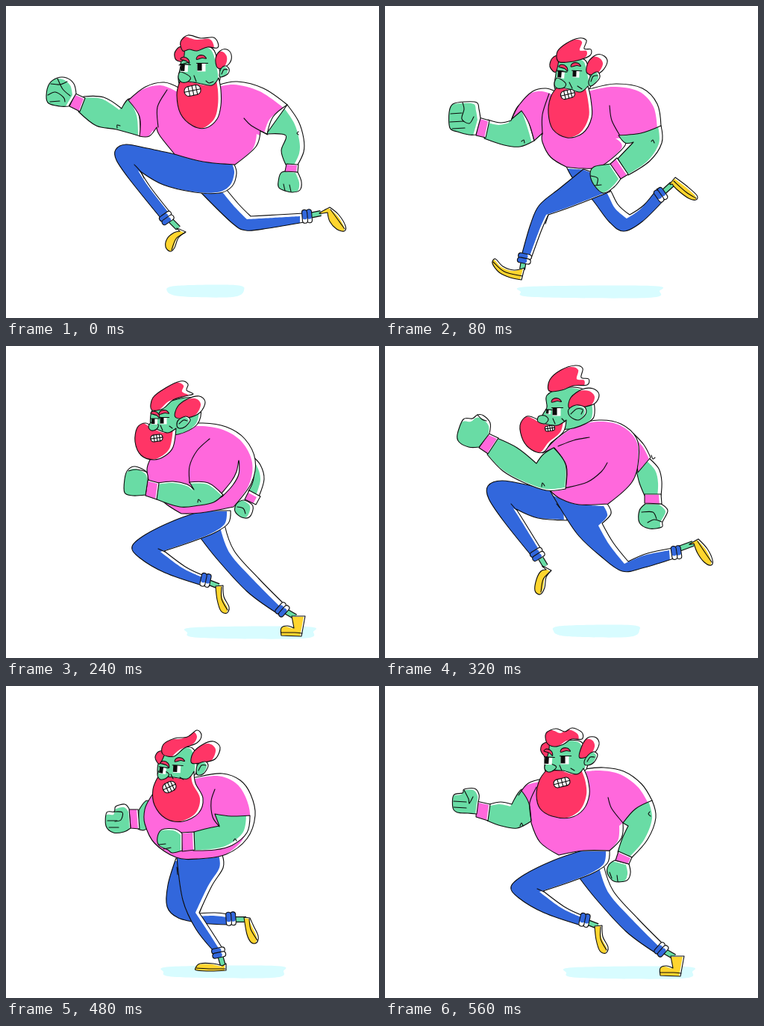
An HTML page with a canvas for the animation above (640 ms loop, 500 by 417 pixels).

```html
<!DOCTYPE html>
<html lang="en">
<head>
<meta charset="utf-8">
<title>Runner</title>
<style>
html, body { margin: 0; width: 100%; height: 100%; overflow: hidden; background: #fff }
canvas { display: block }
</style>
</head>
<body>
<canvas id="stage" width="500" height="417"></canvas>
<script>
const ctx = document.getElementById('stage').getContext('2d');
const GREEN = '#69dca5', PINK = '#ff68dc', BLUE = '#3267dc', RED = '#ff3566',
      YELLOW = '#ffd52e', SHADE = '#d8fcff', INK = '#0c0c0c';

// Smooth curve through "x,y" points; a "!" after a point makes it a corner.
function curve(text, closed = true) {
  const pts = text.split(' ').map(s => {
    const [x, y] = s.split(',').map(parseFloat);
    return { x, y, k: s.endsWith('!') ? 0 : 1 / 6 };
  });
  const n = pts.length, path = new Path2D();
  const at = i => closed ? pts[(i + n) % n] : pts[Math.max(0, Math.min(n - 1, i))];
  path.moveTo(pts[0].x, pts[0].y);
  for (let i = 0; i < (closed ? n : n - 1); i++) {
    const a = at(i - 1), b = at(i), c = at(i + 1), d = at(i + 2);
    path.bezierCurveTo(b.x + (c.x - a.x) * b.k, b.y + (c.y - a.y) * b.k,
      c.x - (d.x - b.x) * c.k, c.y - (d.y - b.y) * c.k, c.x, c.y);
  }
  if (closed) path.closePath();
  return path;
}

// White outlined shape whose colour is printed slightly off register.
function part(color, shape, dx = -3, dy = 2) {
  const path = typeof shape === 'string' ? curve(shape) : shape;
  ctx.fillStyle = '#fff';
  ctx.fill(path);
  ctx.save();
  ctx.clip(path);
  ctx.translate(dx, dy);
  ctx.fillStyle = color;
  ctx.fill(path);
  ctx.restore();
  ctx.stroke(path);
}

function line(...curves) {
  for (const c of curves) ctx.stroke(curve(c, false));
}

function placed(x, y, deg, draw) {
  ctx.save();
  ctx.translate(x, y);
  ctx.rotate(deg * Math.PI / 180);
  draw();
  ctx.restore();
}

function cuff(x, y, deg) {
  placed(x, y, deg, () => {
    for (const top of [-6, 0]) {
      const band = new Path2D();
      band.roundRect(-9, top, 18, 7, 3.5);
      part(BLUE, band, -5, 0);
    }
  });
}

function foot(ankle, shoe, sole) {
  const path = curve(ankle, false);
  for (const [color, width] of [[INK, 8], [GREEN, 5.6]]) {
    ctx.save();
    ctx.strokeStyle = color;
    ctx.lineWidth = width;
    ctx.lineCap = 'butt';
    ctx.stroke(path);
    ctx.restore();
  }
  part(YELLOW, shoe, -2, 1);
  if (sole) line(sole);
}

function eye(x, y, size, deg) {
  placed(x, y, deg, () => {
    ctx.fillStyle = '#fff';
    ctx.fillRect(-size / 2, -size / 2, size, size);
    ctx.fillStyle = INK;
    ctx.fillRect(-size / 2, -size / 2, size * .55, size * .9);
    line(`${-size / 2 - 1},${-size / 2} ${size / 2 + 3},${-size / 2}`);
  });
}

function brow(x, y, deg) {
  placed(x, y, deg, () => part(RED, '-6,1 -3,-3 4,-2 7,3 2,1', 0, 0));
}

function mouth(x, y, w, h, deg) {
  placed(x, y, deg, () => {
    const box = new Path2D();
    box.roundRect(-w / 2, -h / 2, w, h, h * .45);
    part('#fff', box);
    line(`${-w / 2},0 ${w / 2},0`);
    for (const k of [-.22, .02, .25]) line(`${w * k},${-h / 2} ${w * k},${h / 2}`);
  });
}

function head(h) {
  part(GREEN, h.face, -3, 1);
  if (h.tuft) part(RED, h.tuft, 0, 0);
  part(RED, h.quiff, -6, 2);
  part(RED, h.back, -6, 3);
  part(GREEN, h.ear, -2, 1);
  line(h.earFold);
  part(RED, h.beard, -4, 0);
  part(GREEN, h.nose, 0, 0);
  h.eyes.forEach(e => eye(...e));
  h.brows.forEach(b => brow(...b));
  mouth(...h.mouth);
}

const uppers = {
  leap() {
    part(GREEN, '377,132! 392,154 399,177 399,195 390,214! 375,212! 369,193 375,173 349,171!', -6, 2);
    part(GREEN, '370,222 365,235 366,243 374,247 384,249 394,246 396,235 391,222!', -3, 1);
    line('372,238 374,247', '380,239 382,248', '392,168 390,170 392,172');
    part(PINK, '376,211! 392,212! 391,222! 374,221!', -2, 1);
    part(GREEN, '104,121! 131,122 155,137! 166,124 178,144 180,174! 148,165 121,160 97,141!');
    line('149,163 149,159 153,160');
    part(PINK, '164,126! 187,108 212,102 233,110! 284,106! 310,101 345,110 377,132! 358,148 350,171! 341,167! 335,188 307,212! 264,208 226,198! 206,173 202,162! 192,174 179,174! 179,148', -5, 4);
    line('216,112 203,135 204,162', '319,150 329,160 351,172');
    part(PINK, '93,117! 106,123! 99,141! 85,134!', -2, 1);
    part(GREEN, '94,117! 91,104 81,96 69,96 58,104 54,120 57,130 72,134 84,134!', -5, 2);
    line('60,104 72,105 82,101', '56,119 66,115 77,122 79,128', '69,97 76,111 86,120', '59,128 72,127');
    head({
      face: '238,58 258,52 277,57 284,75 287,98 277,109 258,113 236,107 231,98 234,80',
      tuft: '237,73 228,72 226,63 232,55 239,57',
      quiff: '237,60 234,48 244,39 261,43 278,42 284,49 283,56 270,55 256,60 246,58',
      back: '283,82 281,70 287,60 296,58 302,65 300,76 290,83',
      ear: '286,92 288,84 294,80 299,84 297,91 288,95', earFold: '289,91 292,85 297,85',
      beard: '233,101! 229,119 234,144 250,160 268,163 283,151 288,133 288,112 285,96! 276,106 257,103 244,101',
      nose: '234,88 231,96 236,102 244,101 247,95',
      eyes: [[239, 83, 10, 4], [262, 82, 11, 0]], brows: [[240, 72, 18], [261, 69, -15]],
      mouth: [250, 113, 22, 13, -12]
    });
    line('252,93 255,101', '268,100 272,103 278,101', '232,79 245,75');
  },

  reach() {
    part(GREEN, '138,152! 155,156 169,153! 183,132 200,180! 181,188 160,186 133,177!', -3, 3);
    part(PINK, '170,151! 180,132 198,114 215,110 228,114! 278,110! 310,104 345,110 365,131 370,161! 345,170 314,173! 322,186 290,214 265,217 243,215! 222,202 211,182 211,170! 200,180! 193,157 183,140!', -5, 4);
    line('220,117 211,145 211,171', '301,133 304,153 316,175', '183,181 186,179 187,183');
    part(GREEN, '313,173! 343,170 370,160! 371,183 355,207 326,226! 312,204! 333,182! 322,183', -4, 1);
    line('357,181 359,179 361,183');
    part(GREEN, '303,211! 295,212 280,215 275,224 280,239 293,250 307,242 316,231!', -3, 0);
    line('276,227 285,230 284,239', '281,240 290,239');
    part(PINK, '311,203! 302,211! 316,231! 326,225!', -2, 1);
    part(PINK, '126,149! 140,153! 135,176! 122,173!', -2, 1);
    part(GREEN, '128,150! 126,138 123,129 107,128 91,131 86,142 87,163 97,168 112,172 122,172!', -4, 2);
    line('104,129 106,138 103,151 113,157 119,148', '88,144 103,143', '87,155 105,154', '90,164 107,163');
    head({
      face: '231,73 250,70 268,72 274,89 275,109 256,118 232,113 227,107 229,91',
      tuft: '229,88 221,81 224,70 233,67',
      quiff: '232,74 231,61 243,50 260,43 270,46 267,57 276,58 275,66 261,72 245,75',
      back: '270,88 273,74 284,65 294,67 298,75 291,87 279,92',
      ear: '273,101 277,92 285,88 288,95 282,103 275,107', earFold: '276,101 279,94 285,93',
      beard: '231,108! 222,122 219,143 225,165 244,176 265,170 277,149 276,125 272,107! 262,115 247,111',
      nose: '231,96 227,104 231,110 240,109 242,103',
      eyes: [[236, 92, 9, 5], [256, 91, 9, 2]], brows: [[239, 82, 18], [255, 79, -12]],
      mouth: [245, 118, 19, 11, -14]
    });
    line('247,102 251,110', '258,107 264,111', '230,86 239,87');
  },

  gather() {
    part(GREEN, '178,166! 189,153 198,166 188,191 177,191!', 0, 0);
    part(PINK, '165,165! 177,165! 179,191! 167,190!', -2, 0);
    part(GREEN, '165,164! 159,158 147,161 145,168 135,169 134,187 144,196 158,195 167,190!', -1, 4);
    line('145,168 156,169 154,179 146,181', '136,180 149,180', '138,189 151,189');
    part(PINK, '207,130! 193,150 186,165 186,184 199,210 228,229 258,231 295,225 323,204 334,173 328,145 314,126 290,117 260,121!', -7, 3);
    part(GREEN, '280,171! 302,174 327,173! 323,196 303,213 280,219 251,220! 252,195! 267,191 286,187!', -5, -1);
    line('280,138 275,154 277,175 286,188', '305,207 307,204 309,207');
    part(PINK, '235,196! 252,195! 253,219! 236,221!', -2, 1);
    part(GREEN, '236,197! 226,191 209,192 203,202 205,213 217,219 223,223 236,220!', -2, 2);
    line('205,212 214,211', '211,218 221,216');
    head({
      face: '208,96 230,84 250,83 256,102 253,119 232,128 208,124 203,113',
      tuft: '206,104 200,96 204,88 213,88',
      quiff: '210,91 211,78 226,70 243,68 256,59 262,66 256,76 239,83 225,94',
      back: '249,103 251,89 264,78 278,74 287,82 281,97 266,102',
      ear: '255,115 257,105 267,101 271,107 265,117 257,119', earFold: '258,113 262,106 268,106',
      beard: '204,121! 197,138 199,159 214,177 237,181 258,170 264,150 254,130 252,114! 243,124 225,122',
      nose: '207,112 203,119 207,125 215,123 218,117',
      eyes: [[210, 113, 9, 8], [229, 111, 10, 3]], brows: [[213, 104, 18], [232, 99, -12]],
      mouth: [219, 135, 18, 13, -25]
    });
    line('221,118 224,124', '233,122 238,125');
  },

  twist() {
    part(GREEN, '337,166! 354,150! 367,164 371,181 370,200! 348,200! 341,183', -5, 2);
    part(GREEN, '349,211! 370,211! 379,220 372,235 371,242 354,244 341,236 341,220', -3, 1);
    line('344,222 359,222 364,231', '352,236 361,232 371,235', '357,146 359,151 362,149');
    part(PINK, '348,198! 370,198! 371,211! 348,210!', -3, 1);
    part(PINK, '333,117! 347,132 356,149! 339,169!', -2, 2);
    part(PINK, '211,143! 232,122 257,106 287,99 316,104 337,123 340,150 331,182 299,211! 260,212 235,204 221,193! 242,190! 243,160 227,136!', -1, 2);
    line('232,134 253,126 274,122', '241,190 271,182 290,168 298,156');
    part(GREEN, '150,123! 177,136 203,157! 212,145 226,136! 242,158 242,191! 216,193 185,182 158,167 137,145!', -1, -2);
    line('210,188 211,183 214,187');
    part(PINK, '139,117! 152,123! 138,144! 126,136!', -2, 1);
    part(GREEN, '140,117! 141,103 132,93 124,92 117,97 105,98 97,118 99,128 112,135 126,135!', -2, 4);
    line('124,92 130,98 136,100');
    head({
      face: '217,66 237,56 264,57 278,70 281,90 274,101 247,111 218,108 211,94 217,82',
      quiff: '220,60 221,45 236,32 255,26 265,30 263,42 273,44 271,52 253,53 237,59',
      back: '247,83 249,69 264,58 279,57 287,65 281,77 263,82',
      ear: '248,94 246,85 256,79 268,82 269,91 259,99', earFold: '249,91 257,84 265,85 263,91',
      beard: '204,98! 190,94 181,106 185,126 197,139 212,142 223,129 239,115 243,99! 231,106 215,104',
      nose: '214,93 206,94 205,101 214,104 219,98',
      eyes: [[219, 88, 6, 4], [230, 88, 11, 0]], brows: [[229, 73, -12]],
      mouth: [221, 110, 13, 7, -8]
    });
    line('225,97 228,104', '237,97 241,101');
  },

  drive() {
    part(GREEN, '335,144! 347,157 352,176 345,199! 331,192! 338,174', -5, 1);
    part(PINK, '332,191! 347,199! 341,210! 326,203!', -5, 1);
    part(GREEN, '325,204 315,209 313,219 322,227 333,226 337,212', -4, 0);
    line('316,213 324,215 327,222');
    part(PINK, '200,148! 222,127 245,105 270,101 301,106 326,122 340,150 335,181 311,213! 267,221 241,222! 218,207 201,186 195,164', -4, 4);
    part('#fff', '318,151 318,169 310,184 296,199! 291,200 308,179 315,166', 0, 0);
    line('279,122 262,138 252,159 252,181');
    part(GREEN, '209,181! 230,179 249,183 258,190! 252,180! 277,181 297,197! 284,207 265,211 239,213 208,203!', -1, 2);
    line('263,207 264,203 267,206');
    part(PINK, '196,177! 211,181! 208,203! 193,198!', -2, 1);
    part(GREEN, '196,177! 194,166 179,159 169,164 165,176 165,194 176,198 193,197!', -1, 3);
    line('170,165 181,163 194,166');
    head({
      face: '203,82 225,72 254,67 267,82 262,103 237,116 209,115 200,105',
      quiff: '201,83 203,67 220,54 240,45 250,49 248,57 257,62 246,65 230,70 216,82',
      back: '233,93 236,79 249,69 265,65 273,73 266,87 249,94',
      ear: '235,104 237,97 247,92 253,97 246,106 238,108', earFold: '238,102 244,97 249,98',
      beard: '203,107! 193,101 182,107 179,126 187,144 204,150 219,145 230,133 234,108! 223,114 210,110',
      nose: '201,100 197,106 201,111 208,109 210,103',
      eyes: [[205, 99, 8, 0], [217, 98, 9, 0]], brows: [[206, 89, 18], [217, 87, -14]],
      mouth: [208, 121, 16, 9, -8]
    });
    line('213,104 216,111', '225,105 229,108');
  },

  push() {
    part(GREEN, '140,158! 155,155 170,158! 184,138 196,157 197,180! 177,190 156,187 137,180!', -2, 3);
    line('181,187 183,183 185,187');
    part(PINK, '179,146! 192,130 212,124! 268,111! 293,109 320,114 344,131 358,153! 338,167 319,183! 317,203 301,220! 266,220 233,226! 208,209 196,183! 193,157 183,140!', -5, 4);
    line('203,135 194,156 196,180', '299,149 304,164 319,183');
    part(GREEN, '319,183! 336,164 358,153! 363,176 352,205 331,229! 312,222! 318,204 326,187!', -5, 1);
    line('355,168 353,171 356,174');
    part(GREEN, '308,233! 327,238! 329,250 324,260 307,261 298,250 300,239', -4, 1);
    line('301,249 304,257', '311,253 312,261');
    part(PINK, '313,221! 331,229! 327,238! 309,233!', -2, 1);
    part(PINK, '123,154! 141,158! 138,180! 122,175!', -2, 1);
    part(GREEN, '125,155! 126,145 120,137 106,138 104,143 92,146 91,163 97,169 111,170 123,171!', -2, 2);
    line('106,139 112,151 113,157 118,148', '92,154 109,155', '92,162 109,163');
    head({
      face: '218,79 239,73 262,74 270,90 270,111 251,119 219,117 214,104',
      tuft: '217,95 209,87 211,78 220,76',
      quiff: '217,76 216,63 229,57 241,61 251,56 264,62 264,71 250,71 239,78 227,81',
      back: '261,96 264,80 272,69 283,69 287,78 279,91',
      ear: '267,103 270,95 279,88 285,92 280,102 271,106', earFold: '271,101 275,95 281,95',
      beard: '216,113! 207,126 203,146 208,164 224,174 248,176 266,165 274,145 272,125 266,110! 257,118 238,113',
      nose: '217,103 214,110 219,115 227,112 229,107',
      eyes: [[219, 100, 10, 4], [241, 99, 11, 0]], brows: [[219, 88, 20], [241, 86, -14]],
      mouth: [237, 129, 22, 11, -14]
    });
    line('234,106 237,113', '249,110 254,113');
  }
};

const legs = {
  leap() {
    foot('402,281 422,277', '420,277 434,269! 446,279 455,294 453,301 443,298 434,288 431,276!', '435,272 446,287 454,298');
    part(BLUE, '261,249! 292,241! 312,265 328,281! 364,279 399,277! 399,289! 352,297 322,300 303,290', -5, 4);
    cuff(404, 281, 85);
    foot('221,287 231,297', '229,297 241,302! 231,310 226,323 220,328 214,322 216,311 225,303 233,301!', '240,303 228,311 222,326');
    part(BLUE, '226,198! 189,190 161,185 147,192 148,206 165,231 207,283! 221,277! 195,244 180,221! 211,239 253,249 286,250 303,241 309,224 306,212!', -3, -1);
    line('172,212 181,222 185,230');
    cuff(215, 283, -35);
  },
  reach() {
    foot('374,248 385,238', '382,238 389,229! 405,241 418,253 417,259 407,257 391,245 385,238!', '387,234 404,249 417,257');
    part(BLUE, '242,212! 275,214! 299,241 312,265 328,279! 347,266 365,244! 376,257! 345,288 320,301 301,289 278,259 253,232', -4, 5);
    cuff(370, 252, 55);
    foot('186,340 184,352', '148,338 144,344 153,356 168,363 183,366! 187,350! 173,353 158,348', '145,342 160,355 184,361');
    part(BLUE, '266,218! 235,243 207,266 195,292 183,334! 196,337! 210,299 219,279! 251,268 302,248! 286,225!', -3, 0);
    line('215,291 219,279');
    cuff(187, 337, 12);
  },
  gather() {
    foot('307,312 322,312', '319,309! 327,310! 332,321 338,334 336,343 329,343 323,332', '326,311 328,325 337,340');
    part(BLUE, '228,230! 217,266 216,295 231,310 263,317 299,319! 298,305! 280,303 259,304! 274,265 290,228!', -2, 4);
    cuff(302, 311, 86);
    foot('287,360 291,374', '254,377 260,371 278,371 290,374! 295,371! 295,380! 275,381 256,380', '255,377 275,378 294,378');
    part(BLUE, '229,229! 290,226! 291,243 276,267 259,303! 275,327 291,352! 278,354! 254,324 237,286', -5, 0);
    line('229,242 230,252');
    cuff(285, 356, -12);
  },
  twist() {
    foot('209,284 215,294', '211,294 223,300! 216,309 214,323 208,332 201,327 203,312 209,301 216,299!', '222,301 212,312 209,329');
    part(BLUE, '242,198! 197,187 157,180 138,187 139,204 159,234 196,280! 209,271! 188,237 176,218! 205,230 244,233!', -4, -1);
    line('169,211 176,219');
    cuff(204, 278, -32);
    foot('394,271 413,264', '408,265 420,258! 432,271 439,286 437,293 428,289 419,277 414,264!', '419,261 429,276 438,289');
    part(BLUE, '221,193! 259,207 298,211! 303,224 291,237! 306,263 326,288! 352,277 386,270! 387,284! 348,296 318,301 288,280 260,254 240,225', -5, 3);
    line('230,211 234,216');
    cuff(391, 276, 82);
  },
  drive() {
    foot('180,337 173,352', '138,322 134,329 142,344 157,355 172,361! 175,350! 163,348 151,333', '135,326 152,348 173,355');
    part(BLUE, '243,222! 218,244 194,280 175,328! 189,334! 211,287! 234,271 263,259!', -4, 0);
    cuff(181, 333, 20);
    foot('374,261 387,252', '383,253 391,244! 407,253 422,262 424,269 412,270 397,258 388,251!', '390,249 406,263 423,267');
    part(BLUE, '241,222! 267,221 310,212! 309,231 298,250 303,292! 330,273 360,255! 374,267! 337,298 295,316 278,298 264,263', -5, 4);
    line('248,233 252,244', '263,260 257,248');
    cuff(369, 264, 60);
  },
  push() {
    foot('374,354 388,362', '383,361! 401,361! 396,388! 369,387! 369,377 377,374 386,377!', '369,383 387,383 397,384');
    part(BLUE, '261,257! 293,239! 306,274 339,311 375,347! 363,357! 323,328 284,286', -6, 3);
    cuff(370, 352, -48);
    foot('272,316 285,321', '281,321! 291,320! 292,335 299,349 296,357 288,354 283,339', '289,322 289,338 297,353');
    part(BLUE, '264,220! 226,233 187,252 169,268 179,283 213,303 263,320! 268,308! 242,296 212,274! 248,262 279,250 298,237 301,220!', -5, 1);
    line('204,271 213,275');
    cuff(268, 313, 102);
  }
};

// Shadow left edge, right edge and centre height, then body, legs and body offset.
const poses = [
  [216, 319, 381, 'leap', 'leap'],
  [182, 368, 382, 'reach', 'reach'],
  [211, 372, 382, 'gather', 'gather'],
  [243, 412, 383, 'drive', 'push', -6, 2],
  [226, 341, 381, 'twist', 'twist'],
  [170, 356, 382, 'drive', 'drive'],
  [211, 372, 382, 'gather', 'gather'],
  [243, 412, 383, 'push', 'push']
];

function draw([left, right, y, upper, leg, dx = 0, dy = 0]) {
  ctx.fillStyle = '#fff';
  ctx.fillRect(0, 0, 500, 417);
  ctx.lineWidth = 1.1;
  ctx.strokeStyle = INK;
  ctx.lineJoin = ctx.lineCap = 'round';
  ctx.fillStyle = SHADE;
  ctx.fill(curve(`${left},${y} ${left + 12},${y - 7} ${right - 12},${y - 8} ${right},${y - 1} ${right - 16},${y + 8} ${left + 18},${y + 7}`));
  legs[leg]();
  placed(dx, dy, 0, uppers[upper]);
}

function tick() {
  draw(poses[Math.floor(performance.now() / 80) % poses.length]);
  requestAnimationFrame(tick);
}
tick();
</script>
</body>
</html>
```
